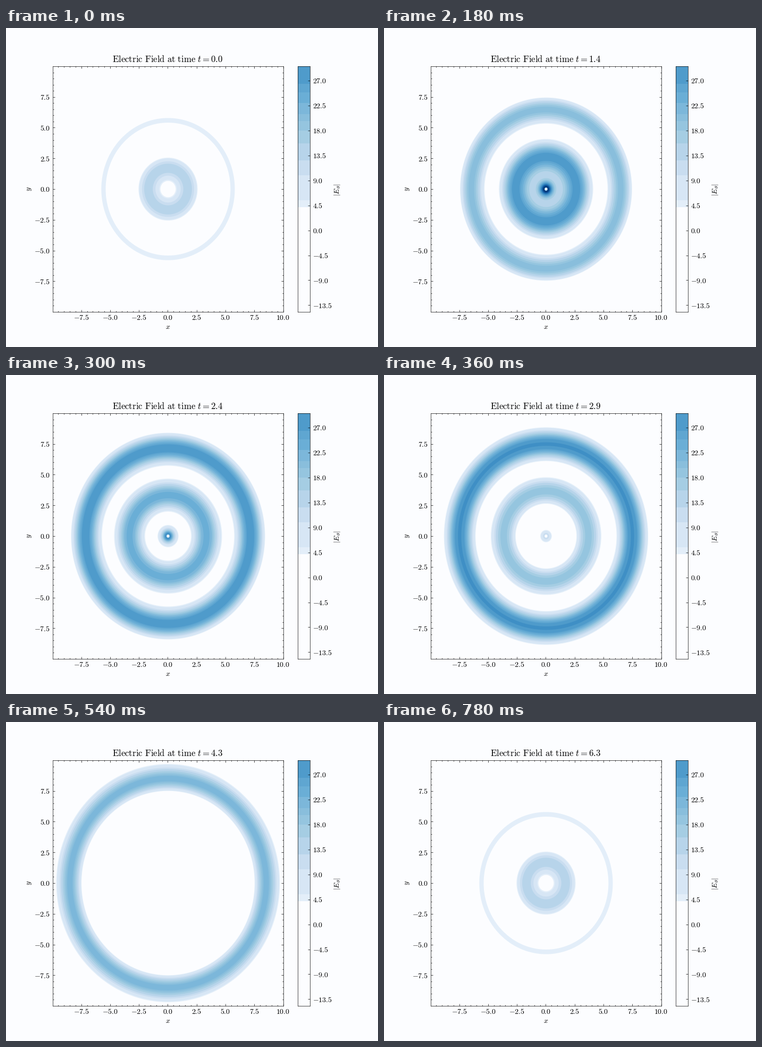
A matplotlib script that plays this animation: 700 px wide and 600 px high, repeating every 800 ms.

```python
import numpy as np
import matplotlib
import matplotlib.pyplot as plt
from matplotlib.animation import FuncAnimation
from matplotlib.ticker import MultipleLocator

FRAMES, STEP_MS = 40, 20
R_MIN, R_MAX = 0.1, 10.0
PEAK = 47.6
BACK = "#fcfdff"
BAR_LIMITS = (-14.7, 29.55)

plt.rcParams.update({
    "mathtext.fontset": "cm",
    "font.size": 10,
    "axes.linewidth": 0.5,
    "xtick.direction": "in", "ytick.direction": "in",
    "xtick.major.size": 3, "ytick.major.size": 3,
    "xtick.minor.size": 1.5, "ytick.minor.size": 1.5,
    "xtick.major.width": 0.5, "ytick.major.width": 0.5,
    "xtick.minor.width": 0.5, "ytick.minor.width": 0.5,
})

# Colour bands of the field strength; everything below the first is blank.
levels = np.array([4.2, 5.46, 9.96, 12.6, 15.7, 18.0, 19.7, 20.9, 22.9,
                   24.9, 26.4, 29.3, 31, 33, 35, 37, 39, 41, 43, 45, PEAK])
mids = (levels[:-1] + levels[1:]) / 2
blues = matplotlib.colormaps["Blues"]
back_rgb = matplotlib.colors.to_rgb(BACK)
band_rgb = np.vstack([back_rgb, blues(mids / PEAK)[:, :3], blues(1.0)[:3]])

# Radial samples, fine enough to soften band edges over one pixel.
PER_UNIT = 400
radii = np.arange(0, 14.5, 1 / PER_UNIT) + 0.5 / PER_UNIT
SOFT = PER_UNIT // 22


def field(r, t):
    """Dipole field whose polar angle grows along with the radius."""
    angle = 2 * np.pi * (r - R_MIN) / (R_MAX - R_MIN)
    wave = np.cos(t - r) / r - (1 - 1 / r**2) * np.sin(t - r)
    inside = (r > R_MIN) & (r < R_MAX)
    return np.where(inside, 30 * np.sin(angle) * wave, 0)


def radial_colours(t):
    rgb = band_rgb[np.digitize(field(radii, t), levels)]
    padded = np.pad(rgb, ((SOFT // 2 + 1, SOFT - SOFT // 2 - 1), (0, 0)), mode="edge")
    total = np.cumsum(padded, axis=0)
    soft = (total[SOFT:] - total[:-SOFT]) / SOFT
    return np.round(soft * 255).astype(np.uint8)


def tick_text(value, _):
    return f"${value:.1f}$"


fig = plt.figure(figsize=(7, 6), dpi=100, facecolor=BACK)
ax = fig.add_axes([0.125, 0.11, 0.62, 0.77], facecolor=BACK)
bar = fig.add_axes([0.78375, 0.11, 0.033, 0.77], facecolor=BACK)

x_lim, y_lim = (-9.995, 10.0), (-9.9987, 9.9987)
W, H = 434, 462
xs = x_lim[0] + (np.arange(W) + 0.5) * (x_lim[1] - x_lim[0]) / W
ys = y_lim[1] - (np.arange(H) + 0.5) * (y_lim[1] - y_lim[0]) / H
index = (np.hypot(xs[None, :], ys[:, None]) * PER_UNIT).astype(int)

image = ax.imshow(radial_colours(0)[index], extent=(*x_lim, *y_lim),
                  aspect="auto", interpolation="nearest")
ax.set(xlim=x_lim, ylim=y_lim)
for axis in (ax.xaxis, ax.yaxis):
    axis.set_major_locator(MultipleLocator(2.5))
    axis.set_minor_locator(MultipleLocator(0.5))
    axis.set_major_formatter(tick_text)
ax.tick_params(which="both", top=True, right=True)
ax.tick_params(axis="x", pad=2.8)
title = ax.set_title("", fontsize=12.1)

# Colour bar
edges = np.append(levels[:11], BAR_LIMITS[1])
for low, high, rgb in zip(edges[:-1], edges[1:], band_rgb[1:]):
    bar.axhspan(low, high, color=rgb, lw=0, zorder=0)
bar.set(xlim=(0, 1), ylim=BAR_LIMITS, xticks=[])
bar.yaxis.tick_right()
bar.yaxis.set_major_locator(MultipleLocator(4.5))
bar.yaxis.set_major_formatter(tick_text)


def label(x, y, text, rotation=0):
    fig.text(x / 700, 1 - y / 600, text, rotation=rotation, ha="center",
             va="baseline", rotation_mode="anchor")


label(305, 566, "$x$")
label(46, 302.5, "$y$", 90)
label(627, 304, r"$|E_\theta|$", 90)


def update(i):
    t = 2 * np.pi * i / (FRAMES - 1)
    image.set_data(radial_colours(t)[index])
    title.set_text(rf"$\mathrm{{Electric\ Field\ at\ time}}\ t = {t:.1f}$")
    return image, title


anim = FuncAnimation(fig, update, frames=FRAMES, interval=STEP_MS,
                     repeat=True, repeat_delay=0)
plt.show()
```
